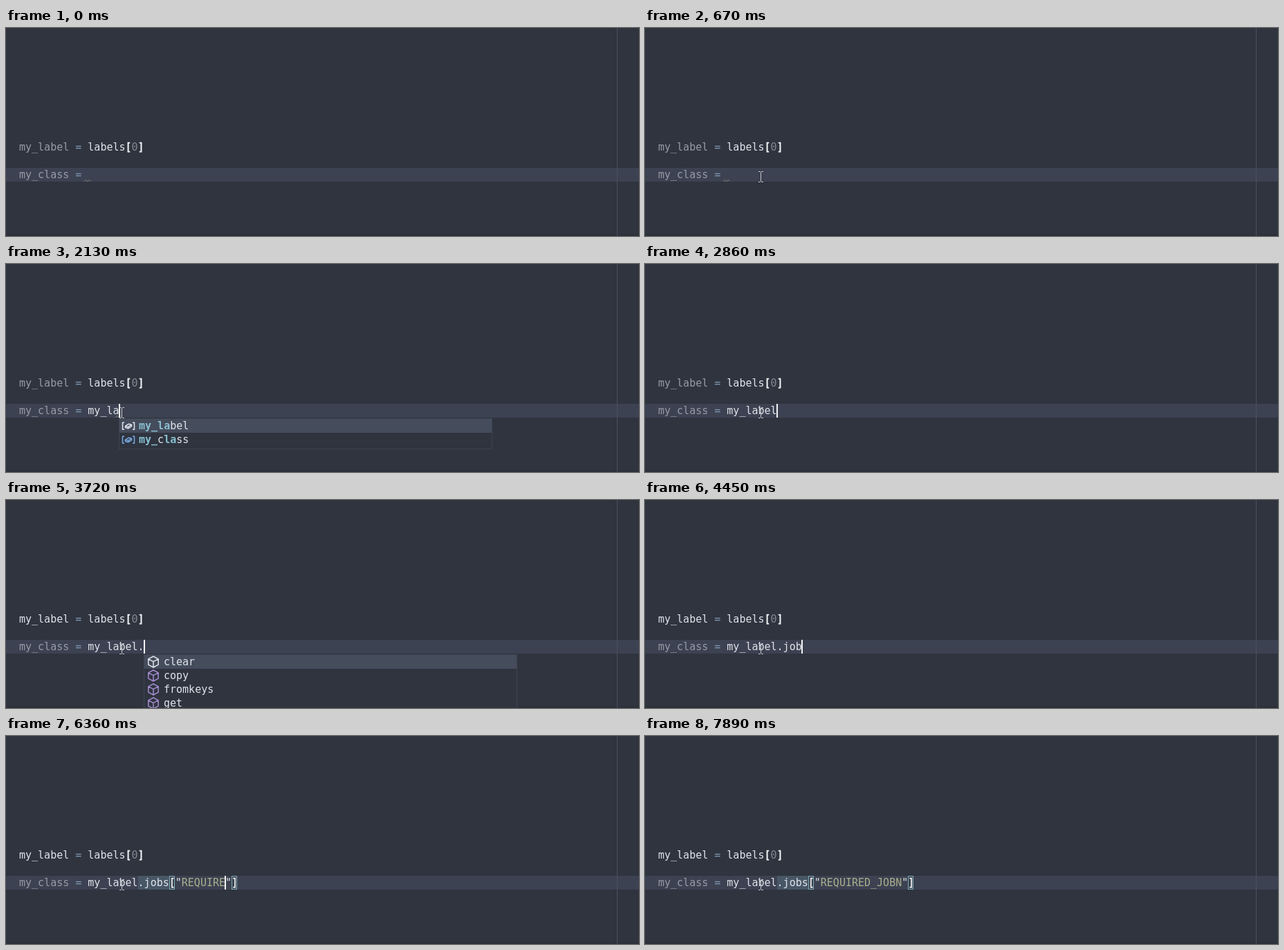
These frames come from a looping animation (915x302 px, 8 s). An HTML page:

```html
<!DOCTYPE html>
<html lang="en">
<head>
<meta charset="utf-8">
<title>Code completion</title>
<style>
  html, body { margin: 0; width: 100%; height: 100%; overflow: hidden; background: #2f343f; }
  svg { display: block; width: 915px; height: 302px; }
  text { font: 15px "DejaVu Sans Mono", "Noto Sans Mono", monospace; white-space: pre; fill: #dfe3ea; }
  .dim { fill: #979ba6; }
  .op { fill: #8098b2; }
  .num { fill: #85868f; }
  .br { fill: #f3f4f6; stroke: #f3f4f6; stroke-width: .5; }
  .str { fill: #abae8e; }
  .hit { fill: #88c0d0; font-weight: 700; }
  .tail { font-size: 12.75px; fill: #a9aebb; text-anchor: end; }
  .icon { fill: none; stroke-width: 1.5; stroke-linejoin: round; }
</style>
</head>
<body>
<svg viewBox="0 0 915 302">
  <defs>
    <path id="main" d="M-7.5 7V-7.5H7.5V7M-7.5 8h16" stroke-dasharray="37.5 0 6.5 0 1.5 1.5 1.5 1.5 1.5 1.5 1.5 1.5 1.5 1.5 1.5 1.5"/>
    <path id="type" d="M-8.2 -1L-3 -7.5L0.5 -4.5L-4.5 1.8ZM-1.5 -1.5H4M-2.5 0V5H3M3.5 -1L6 -3.5L8.5 -1L6 1.5ZM2.5 5.5L5 3L7.5 5.5L5 8Z"/>
    <path id="func" d="M0 -8L7.2 -4.2V4.2L0 8L-7.2 4.2V-4.2ZM-7.2 -4.2L0 -0.3L7.2 -4.2M0 -0.3V8"/>
    <path id="var" d="M-6 -4.8H-8.5V5.2H-6M6 -4.8H8.5V5.2H6M-4.5 .5L.5 -2.8L4.5 -1.8V.6L-.5 3.8L-4.5 2.6ZM-4.5 .5L-.5 1.6L4.5 -1.8M-.5 1.6V3.8"/>
  </defs>
  <rect width="915" height="302" fill="#2f343f"/>
  <rect y="203" width="915" height="20" fill="#3c4251"/>
  <rect y="300" width="915" height="2" fill="#2b2f39"/>
  <rect x="883" width="1" height="302" fill="#4b5060"/>
  <g id="code"></g>
  <g id="popup"></g>
  <path id="mouse" d="M-3.5 -7.5H-1L0 -6.5L1 -7.5H3.5M0 -6.5V6.5M-3.5 7.5H-1L0 6.5L1 7.5H3.5" fill="none" stroke="#c6c8cd"/>
</svg>
<script>
const LOOP = 8000, CH = 9, LEFT = 19, TYPE_X = 118;
const $ = id => document.getElementById(id);
const tint = { main: '#d8dee9', type: '#d6994a', func: '#a58bd0', var: '#7aa9e0' };

const item = (kind, name, tail = '') => ({ kind, name, tail });
const vars = [item('var', 'my_label'), item('var', 'my_class')];
const lists = {
  m: [item('main', 'main', '__main__ with main()'), item('type', 'memoryview'), item('type', 'map'), item('func', 'max')],
  my: vars,
  dict: ['clear', 'copy', 'fromkeys', 'get'].map(n => item('func', n)),
  jobs: [item('var', 'jobs')],
  all: [...vars, item('var', 'labels'), item('type', 'memoryview')]
};

// time, typed text, caret shown, popup [list, column, prefix]
const base = 'my_label', key = base + '.jobs["';
const steps = [
  [0, '', 0], [140, '', 1], [640, '', 0], [1140, '', 1],
  [1400, 'm', 1],
  [1540, 'my', 1, ['m', 1, 'm']],
  [1600, 'my', 1, ['my', 2, 'my']],
  [1670, 'my_', 1, ['my', 2, 'my']],
  [1740, 'my_', 1, ['my', 3, 'my_']],
  [1930, 'my_l', 1, ['my', 4, 'my_l']],
  [2130, 'my_la', 1, ['my', 5, 'my_la']],
  [2660, 'my_la', 0, ['my', 5, 'my_la']],
  [2800, base, 1], [3390, base, 0],
  [3590, base + '.', 1],
  [3720, base + '.', 1, ['dict', 9, '']],
  [3790, base + '.j', 1, ['dict', 9, '']],
  [3910, base + '.j', 1, ['jobs', 10, 'j']],
  [4110, base + '.jo', 1, ['jobs', 10, 'j']],
  [4180, base + '.jo', 1, ['jobs', 11, 'jo']],
  [4450, base + '.job', 1], [4580, base + '.jobs', 1],
  [4840, base + '.jobs[', 1],
  [4910, base + '.jobs[', 1, ['all', 14, '']],
  [5040, key, 1],
  ...[[5510, 1], [5570, 2], [6040, 3], [6160, 4], [6260, 5], [6360, 7], [6560, 8],
    [6760, 9], [7030, 10], [7230, 11], [7430, 13]].map(([t, n]) => [t, key + 'REQUIRED_JOBN'.slice(0, n), 1]),
  [7890, key + 'REQUIRED_JOBN', 0]
];

const span = (cls, s) => `<tspan class="${cls}">${s}</tspan>`;
const text = (x, y, body, cls = '') => `<text x="${x}" y="${y}" class="${cls}">${body}</text>`;
const rect = (x, y, w, h, fill, more = '') =>
  `<rect x="${x}" y="${y}" width="${w}" height="${h}" fill="${fill}" ${more}/>`;

// colours the letters that match the prefix in order
function mark(name, prefix) {
  let n = 0;
  return [...name].map(c => c === prefix[n] ? (n++, span('hit', c)) : c).join('');
}

function drawPopup([list, col, prefix]) {
  const x = TYPE_X + col * CH, rows = lists[list];
  const h = rows.length * 20 + (rows.length > 3 ? 40 : 4);
  let out = rect(x + .5, 224.5, 539, h, '#2f343f', 'stroke="#3d4351"') + rect(x + 1, 225, 538, 20, '#454c5c');
  rows.forEach((r, i) => {
    const y = 225 + i * 20, color = i ? tint[r.kind] : '#dfe3ea';
    out += `<use href="#${r.kind}" class="icon" x="${x + 14}" y="${y + 10}" stroke="${color}"/>`;
    out += text(x + 29, y + 15, mark(r.name, prefix));
    if (r.tail) out += text(x + 526, y + 14, r.tail, 'tail');
  });
  return out;
}

function drawCode(t, typed, caret) {
  const end = TYPE_X + typed.length * CH;
  const [, head, open, quote, str] = typed.match(/^([^[]*)(\[?)("?)(.*)$/);
  let out = '';
  if (typed.includes('.jobs')) out += rect(191, 203, 45, 20, '#485766');
  if (open) {
    const close = end + (quote ? CH : 0);
    for (const x of [TYPE_X + 13 * CH, close])
      out += rect(x + 1.5, 203.5, 7, 19, '#39424e', 'stroke="#7fa8b5"');
  }
  out += text(LEFT, 178, span(t < 3650 ? 'dim' : '', base) + span('op', ' = ') + 'labels' +
    span('br', '[') + span('num', '0') + span('br', ']'));
  out += text(LEFT, 218, span('dim', 'my_class') + span('op', ' = ') + head + span('br', open) +
    quote + span('str', str) + quote + (open && span('br', ']')));
  if (t < 2800)
    out += `<path d="M${end - 5} 223l2.5 -2.5l2.5 2.5l2.5 -2.5l2 2" fill="none" stroke="#858376"/>`;
  if (caret) out += rect(end, 203, 2, 20, '#f2f3f5');
  return out;
}

function moveMouse(t) {
  const p = Math.min(1, Math.max(0, Math.floor((t - 70) / 66.6) / 9)), q = 1 - p;
  const bez = (a, b, c, d) => Math.round(a * q ** 3 + 3 * b * p * q * q + 3 * c * p * p * q + d * p ** 3);
  const x = bez(727, 500, 230, 167) + .5, y = bez(276, 215, 165, 216);
  $('mouse').setAttribute('transform', `translate(${x} ${y})`);
  $('mouse').setAttribute('visibility', t < 70 ? 'hidden' : 'visible');
}

let shown;
const start = performance.now();
function frame() {
  const t = (performance.now() - start) % LOOP;
  const step = steps.findLast(s => s[0] <= t);
  const id = step[0] + (t >= 3650 ? 'b' : 'a');
  if (id !== shown) {
    shown = id;
    $('code').innerHTML = drawCode(t, step[1], step[2]);
    $('popup').innerHTML = step[3] ? drawPopup(step[3]) : '';
  }
  moveMouse(t);
  requestAnimationFrame(frame);
}
frame();
</script>
</body>
</html>
```
